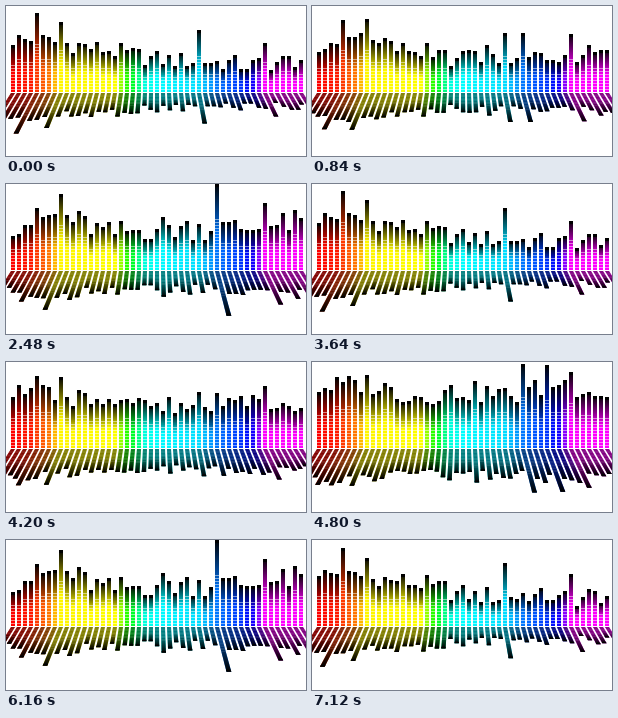
Write an HTML page with a canvas that moves like this. It is 300x150 px and loops after 7160 ms.

```html
<!DOCTYPE html>
<html>
<head>
<meta charset="utf-8">
<title>Spectrum</title>
<style>
html, body { margin: 0; width: 100%; height: 100%; overflow: hidden; background: #fff; }
canvas { display: block; }
</style>
</head>
<body>
<canvas id="stage" width="300" height="150"></canvas>
<script>
const ctx = document.getElementById('stage').getContext('2d');
const LOOP = 7160, STEP = 40, BARS = 49, BASE = 86, MID = 150;

// Hue along the bars: [bar, hue]
const hues = [[0, 0], [3, 6], [6, 28], [8, 58], [17, 60], [19, 110], [20, 130], [22, 172],
  [24, 180], [31, 188], [34, 212], [38, 228], [40, 245], [42, 300], [48, 300]];

// Each pose: an outline of evenly spaced levels, random spread around it, and a few peaks
const calm = {seed: 1, levels: [53, 50, 42, 33, 31, 27, 33], spread: 9, peaks: {4: 79, 8: 70, 31: 62, 42: 49}};
const mixed = {seed: 2, levels: [46, 56, 36, 43, 42, 42, 48], spread: 13, peaks: {8: 76, 34: 86, 42: 67}};
const loud = {seed: 3, levels: [61, 65, 52, 58, 52, 66, 53], spread: 11, peaks: {34: 84, 38: 83, 42: 76}};
const keys = [[0, calm], [1680, mixed], [2480, mixed], [3640, calm], [4800, loud], [6160, mixed], [7160, calm]];

const mix = (a, b, u) => a + (b - a) * u;
const random = (i, seed) => {
  const n = Math.sin(i * 12.9898 + seed * 78.233) * 43758.5453;
  return n - Math.floor(n);
};

// Index of the segment that holds x, and how far x is through it
function locate(points, x) {
  let k = 0;
  while (k < points.length - 2 && x >= points[k + 1][0]) k++;
  return [k, (x - points[k][0]) / (points[k + 1][0] - points[k][0])];
}

function hueAt(i) {
  const [k, u] = locate(hues, i);
  return mix(hues[k][1], hues[k + 1][1], u);
}

function poseHeight({seed, levels, spread, peaks}, i) {
  const [k, u] = locate(levels.map((_, n) => [n * 8]), i);
  return peaks[i] || mix(levels[k], levels[k + 1], u) + spread * (2 * random(i, seed) - 1);
}

function heightAt(i, t) {
  const [k, u] = locate(keys, t);
  const ease = u * u * (3 - 2 * u);
  const bounce = 6 * Math.sin(i * 2.4 + k) * Math.sin(Math.PI * u * (2 + (i * 7 + k) % 3));
  return Math.round(mix(poseHeight(keys[k][1], i), poseHeight(keys[k + 1][1], i), ease) + bounce);
}

const upright = (x, h) => [x, BASE - h];
const floor = (x, h) => {
  const zoom = 1 / (1 - .0019 * h);
  return [MID + (x - MID) * zoom, BASE + 1 + .435 * h * zoom];
};

function slab(view, x, low, high, fill) {
  ctx.fillStyle = fill;
  ctx.beginPath();
  ctx.moveTo(...view(x, low));
  ctx.lineTo(...view(x + 4, low));
  ctx.lineTo(...view(x + 4, high));
  ctx.lineTo(...view(x, high));
  ctx.fill();
}

function bar(view, i, h, shade, shine) {
  const x = 5 + 6 * i;
  const fade = ctx.createLinearGradient(0, view(x, h * .4)[1], 0, view(x, h)[1]);
  fade.addColorStop(0, `rgba(0,0,0,${shade})`);
  fade.addColorStop(1, '#000');
  slab(view, x, 0, h, `hsl(${hueAt(i)},100%,50%)`);
  slab(view, x, 0, h, fade);
  slab(view, x, h - 3, h, '#000');
  for (let y = 2; y < h * .6; y += 3) slab(view, x, y, y + 1, `rgba(255,255,255,${shine})`);
}

function draw(now) {
  const t = Math.floor(now % LOOP / STEP) * STEP;
  ctx.fillStyle = '#fff';
  ctx.fillRect(0, 0, 300, 150);
  for (let i = 0; i < BARS; i++) {
    const h = heightAt(i, t);
    bar(floor, i, h, .5, .2);
    bar(upright, i, h, 0, .5);
  }
  requestAnimationFrame(draw);
}
draw(performance.now());
</script>
</body>
</html>
```
